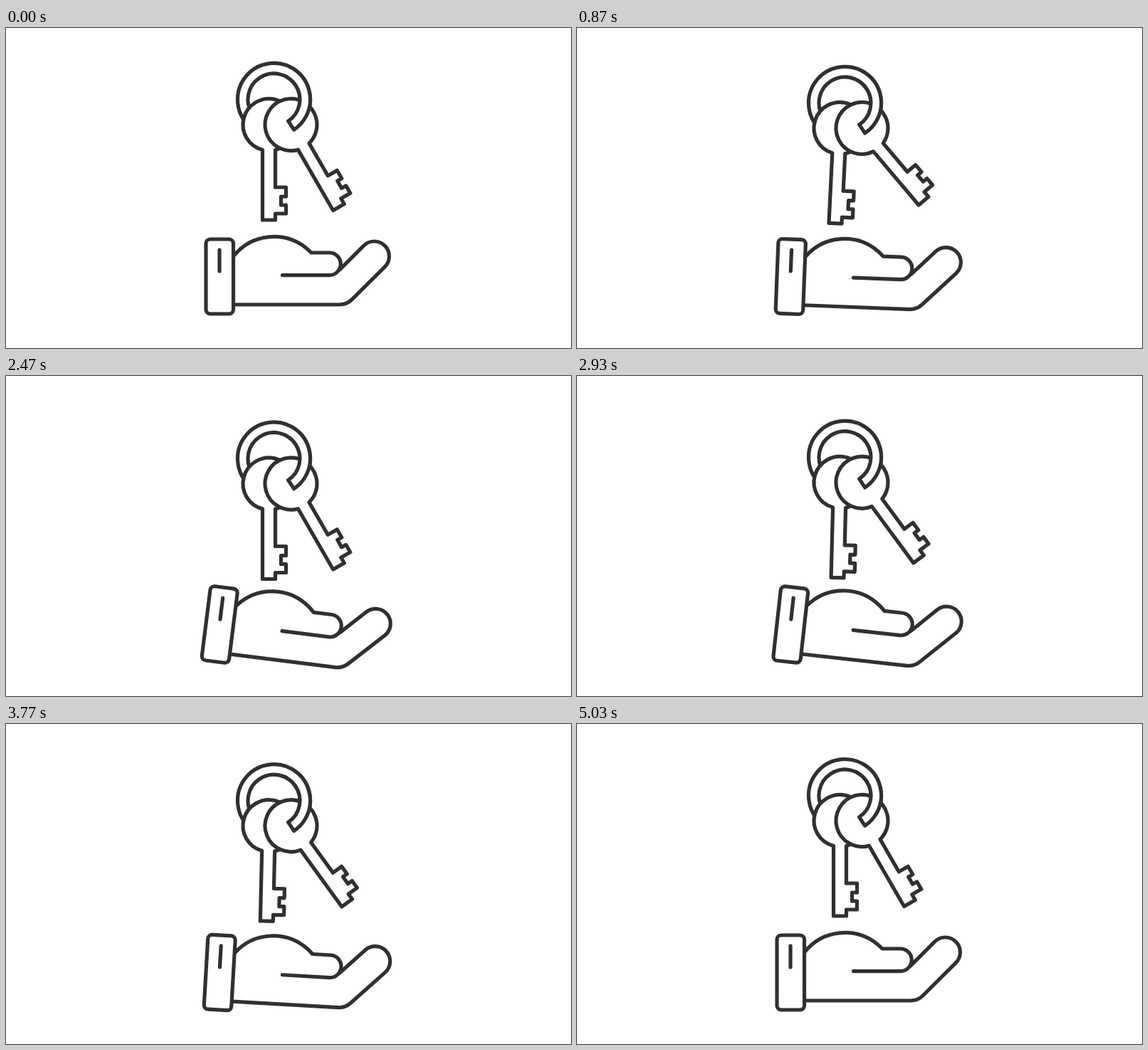
An HTML page with a canvas that plays this animation: 794 px wide and 450 px high, repeating every 5060 ms.

```html
<!DOCTYPE html>
<html lang="en">
<head>
<meta charset="utf-8">
<title>Keys over a hand</title>
<style>
  html, body { margin: 0; width: 100%; height: 100%; overflow: hidden; background: #fff; }
  canvas { display: block; width: 794px; height: 450px; }
</style>
</head>
<body>
<canvas id="stage" width="794" height="450"></canvas>
<script>
const ctx = document.getElementById('stage').getContext('2d');
const LOOP = 5060, PEAK = 2340;
const INK = '#303030', PAPER = '#fff';
const RAD = Math.PI / 180;

const ease = x => x * x * (3 - 2 * x);

// 0 at the loop ends, 1 at the lowest pose
const sink = t => ease(t < PEAK ? t / PEAK : (LOOP - t) / (LOOP - PEAK));

// One outward and back swing, 0..1
function swing(t, start, half) {
  const x = 1 - Math.abs(t - start - half) / half;
  return x > 0 ? ease(x) : 0;
}

function shape(draw, fill) {
  ctx.beginPath();
  draw();
  if (fill) {
    ctx.fillStyle = PAPER;
    ctx.fill();
  }
  ctx.stroke();
}

// Rotates about a point, which becomes the local origin
function turned(x, y, deg, draw) {
  ctx.save();
  ctx.translate(x, y);
  ctx.rotate(deg * RAD);
  draw();
  ctx.restore();
}

const TEETH = [[9, 88], [24, 88], [24, 101], [17, 101], [17, 113],
               [24, 113], [24, 125], [9, 125], [9, 134], [-9, 134]];

function key(x, y, deg) {
  const r = 36.5, gap = Math.asin(9 / r), down = Math.PI / 2;
  turned(x, y, deg, () => shape(() => {
    ctx.arc(0, 0, r, down + gap, down - gap + 2 * Math.PI);
    for (const [px, py] of TEETH) ctx.lineTo(px, py);
    ctx.closePath();
  }, true));
}

// Part of the ring band; only its end is closed with a line
function ring(from, to) {
  const x = 376.5, y = 100.5, inner = 36.5, outer = 51;
  const a = from * RAD, b = to * RAD;
  ctx.beginPath();
  ctx.arc(x, y, outer, a, b);
  ctx.arc(x, y, inner, b, a, true);
  ctx.fillStyle = PAPER;
  ctx.fill();
  ctx.stroke();
}

function keys(t, drop) {
  const left = 2.8 * (swing(t, 0, 840) + swing(t, 2500, 840));
  const right = 10.3 * swing(t, 0, 840) + 12.4 * swing(t, 2500, 840);
  ctx.save();
  ctx.translate(0, drop);
  ring(-230, 56.5);
  key(369.5, 136, left);
  key(400.5, 136, -30 - right);
  ring(-60, 56.5);
  ctx.restore();
}

function hand(deg) {
  turned(300, 349.5, deg, () => {
    ctx.translate(-300, -349.5);
    // Palm and thumb
    shape(() => {
      ctx.arc(376.5, 366, 72.5, -141 * RAD, -43.6 * RAD);
      ctx.lineTo(454.5, 316);
      ctx.arc(454.5, 331.8, 15.8, -Math.PI / 2, Math.PI / 2);
      ctx.lineTo(388.5, 347.6);
    });
    // Fingers and lower edge
    shape(() => {
      ctx.moveTo(469.2, 339.7);
      ctx.arc(517.5, 321, 21, -135 * RAD, 45 * RAD);
      ctx.arcTo(479, 389, 440, 389, 25);
      ctx.lineTo(320, 389);
    });
    // Cuff
    shape(() => ctx.roundRect(281, 297, 38.5, 105, 6), true);
    shape(() => {
      ctx.moveTo(300, 312);
      ctx.lineTo(300, 342);
    });
  });
}

function render(t) {
  const s = sink(t);
  ctx.fillStyle = PAPER;
  ctx.fillRect(0, 0, 794, 450);
  ctx.strokeStyle = INK;
  ctx.lineWidth = 5.2;
  ctx.lineCap = ctx.lineJoin = 'round';
  hand(7.2 * s);
  keys(t, 15.6 * s);
}

const begin = performance.now();
function tick() {
  render((performance.now() - begin) % LOOP);
  requestAnimationFrame(tick);
}
tick();
</script>
</body>
</html>
```
